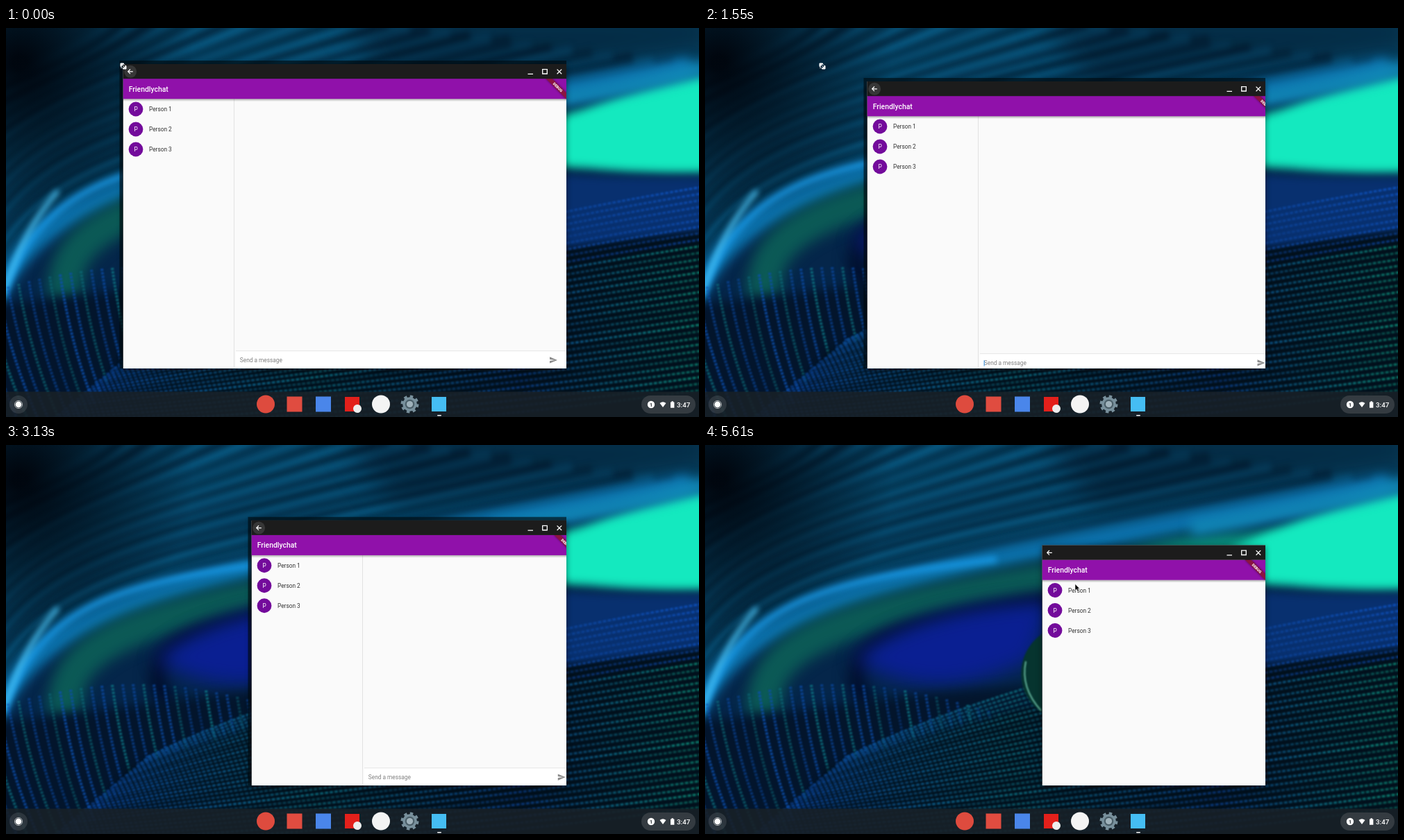
Recreate the animation shown at these times as an HTML page with a canvas. Size 998 px wide and 561 px high, loop 5740 ms.

```html
<!DOCTYPE html>
<html lang="en">
<head>
<meta charset="utf-8">
<title>Resizing a chat window</title>
<style>
  html, body { margin: 0; width: 100%; height: 100%; overflow: hidden; background: #03121f; }
  canvas, #stage { position: absolute; left: 0; top: 0; width: 998px; height: 561px; }
  text { font-family: Roboto, Arial, sans-serif; }
  .item { font-size: 8.32px; fill: #333; }
</style>
</head>
<body>
<canvas id="wall" width="998" height="561"></canvas>
<svg id="stage" viewBox="0 0 998 561">
  <defs>
    <linearGradient id="fade" x2="0" y2="1">
      <stop stop-color="#000" stop-opacity=".32"/><stop offset="1" stop-color="#000" stop-opacity="0"/>
    </linearGradient>
  </defs>

  <g id="shelf">
    <rect y="524.5" width="998" height="36.5" fill="#182027" fill-opacity=".88"/>
    <circle cx="18" cy="543" r="13" fill="#fff" fill-opacity=".1"/>
    <circle cx="18" cy="543" r="5.6" fill="none" stroke="#fff" stroke-opacity=".6"/>
    <circle cx="18" cy="543" r="4.4" fill="#fff"/>
    <circle cx="374" cy="542.5" r="13" fill="#de4b3e"/>
    <rect x="404.5" y="531.5" width="22" height="22" fill="#e04c40"/>
    <rect x="446" y="531.5" width="22" height="22" fill="#4a86ea"/>
    <rect x="488" y="532" width="21" height="21" fill="#e3201b"/>
    <circle cx="506" cy="549" r="6" fill="#eee"/>
    <circle cx="540" cy="542.5" r="13" fill="#f4f4f4"/>
    <g transform="translate(581.5 542.5)">
      <circle r="10.5" fill="none" stroke="#78909c" stroke-width="5" stroke-dasharray="4.12"/>
      <circle r="10.3" fill="#78909c"/>
      <circle r="6.8" fill="#4b5f69"/>
      <circle r="4.6" fill="#9fb2bb"/>
    </g>
    <rect x="613" y="532" width="21" height="21" fill="#45bdf3"/>
    <rect x="621" y="558" width="6" height="1.6" rx=".8" fill="#fff"/>
    <rect x="915" y="530" width="78" height="26" rx="13" fill="#343b41"/>
    <circle cx="929" cy="543" r="5.2" fill="#fff"/>
    <text x="929" y="546" font-size="8" font-weight="700" text-anchor="middle" fill="#30363b">1</text>
    <path d="M941.5 541Q946 537.4 950.5 541L946 547Z" fill="#fff"/>
    <path d="M957 539.5h1.5v-1.2h2.4v1.2h1.5v8.2h-5.4z" fill="#fff"/>
    <text x="966" y="546.5" font-size="9.8" font-weight="500" fill="#fff">3:47</text>
  </g>

  <rect id="frame" fill="#000a10" fill-opacity=".62"/>
  <rect id="shadow" style="filter:drop-shadow(0 2px 4px rgba(0,0,0,.5))"/>

  <svg id="win" overflow="hidden">
    <rect width="100%" height="100%" fill="#fafafa"/>
    <g id="list"></g>
    <g id="wide">
      <path d="M160 50V600" stroke="#e2e2e2"/>
      <g id="bar">
        <rect x="162.5" y="-25" width="700" height="40" fill="#fff"/>
        <path d="M162.5 -25.3H860" stroke="#e0e0e0" stroke-width=".8"/>
        <text x="168.3" y="-9" font-size="8.32" fill="#808080">Send a message</text>
        <path id="caret" d="M168.6 -15.8v8.4" stroke="#2a8be0"/>
      </g>
      <path id="send" fill="#8c8c8c" d="M2 21L23 12 2 3v7l15 2-15 2z"/>
    </g>
    <rect y="50" width="100%" height="4" fill="url(#fade)"/>
    <rect y="21" width="100%" height="29.2" fill="#9011aa"/>
    <text x="8.2" y="39.7" font-size="10.4" font-weight="500" fill="#fff">Friendlychat</text>
    <g id="debug">
      <g transform="translate(0 21) rotate(45)">
        <rect x="-20.8" y="14.5" width="41.6" height="6.3" fill="#8c1440"
              style="filter:drop-shadow(0 0 1.5px rgba(0,0,0,.5))"/>
        <text y="19.5" font-size="5.3" font-weight="900" text-anchor="middle" fill="#fff">DEBUG</text>
      </g>
    </g>
    <rect width="100%" height="21.2" fill="#1c1c1c"/>
    <circle id="halo" cx="10.6" cy="10.8" r="9" fill="#373737"/>
    <path d="M14.3 10.8H7.4M10.5 7.5L7.2 10.8l3.3 3.3" fill="none" stroke="#fff" stroke-width="1.2"/>
    <g id="buttons" fill="none" stroke="#fff" stroke-width="1.3">
      <path d="M-55.5 14.3h7.5M-34.3 7.6h6.6v6.4h-6.6zM-13.4 7.6l6.6 6.6m0-6.6l-6.6 6.6"/>
    </g>
  </svg>

  <g id="resize" transform="translate(169 55)" stroke-linejoin="round">
    <path id="grip" d="M-4-4h4.5v1.3h-3.2v3.2h-1.3zM4 4h-4.5v-1.3h3.2v-3.2h1.3zM-2.5-2.5L2.5 2.5M-1.5 2.2h-2.4M1.8-1.5v-1"
          fill="#fff" stroke="#fff" stroke-width="1"/>
  </g>
  <path id="arrow" d="M0 0v9.2l2.1-1.9 1.5 3.3 1.6-.7-1.4-3.2h2.8z" fill="#000" stroke="#fff" stroke-width=".5"/>
</svg>

<script>
const LOOP = 5740, RIGHT = 807, BOTTOM = 491, TICK = 130;
const $ = id => document.getElementById(id);
const set = (id, attrs) => { for (const k in attrs) $(id).setAttribute(k, attrs[k]); };
const show = (id, on) => set(id, { visibility: on ? 'visible' : 'hidden' });
const move = (id, x, y, more = '') => set(id, { transform: `translate(${x} ${y}) ${more}` });
const mix = (a, b, k) => a + (b - a) * k;

// time, left edge, top edge of the window
const path = [
  [0, 168.5, 52], [430, 170.5, 56], [640, 172, 60], [900, 179, 64], [1160, 197, 71],
  [1420, 221, 73], [1550, 233.5, 77], [1940, 270, 92], [2330, 313, 106], [2460, 322.5, 108.5],
  [2590, 322.5, 108.5], [2870, 330, 108.5], [3390, 377, 109], [3650, 411, 121.5], [3780, 413, 123.5],
  [4040, 413, 123.5], [4430, 465.5, 137], [4560, 467, 138], [4690, 460, 134], [4950, 472, 140],
  [5280, 485.5, 144.5]
];
const ticks = [0, 430];
for (let t = 640; t <= 2590; t += TICK) ticks.push(t);
for (let t = 2870; t <= 4950; t += TICK) ticks.push(t);
ticks.push(5280);

function corner(t) {
  const i = path.findIndex(p => p[0] >= t);
  const b = path[i], a = path[Math.max(0, i - 1)];
  const k = b === a ? 0 : (t - a[0]) / (b[0] - a[0]);
  return [mix(a[1], b[1], k), mix(a[2], b[2], k)];
}

$('list').innerHTML = [1, 2, 3].map(n => `<g transform="translate(0 ${36 + 29 * n})">
  <circle cx="18.5" r="10.4" fill="#730b9b"/>
  <text class="item" x="18.5" y="3" text-anchor="middle" style="fill:#fff">P</text>
  <text class="item" x="37.5" y="3">Person ${n}</text></g>`).join('');

function render(t) {
  const i = ticks.findLastIndex(s => s <= t), last = i === ticks.length - 1;
  const [x, y] = corner(ticks[i]);
  // the content is laid out for the size the window had one step earlier
  const [px, py] = last ? [x, y] : corner(ticks[Math.max(0, i - 1)]);
  const w = RIGHT - x, h = BOTTOM - y, lagX = x - px, lagY = y - py;

  set('win', { x, y, width: w, height: h });
  set('shadow', { x, y, width: w, height: h });
  set('frame', { x: x - 5, y: y - 5, width: w + 5, height: h + 5 });
  move('buttons', w, 0);
  move('debug', w + lagX, 0);
  move('bar', 0, h + lagY);
  move('send', w + lagX - 25, h + lagY - 18.3, 'scale(.52)');
  set('wide', { display: RIGHT - x > 417 ? 'inline' : 'none' });
  set('caret', { display: t >= 100 && t < 2590 ? 'inline' : 'none' });
  show('frame', !last);
  show('halo', !last);
  show('resize', t < 1940);
  show('arrow', last);
  if (t < 5430) move('arrow', 513, 175);
  else if (t < 5610) move('arrow', 523, 184);
  else move('arrow', 533, 200.5);
}

function paintWall() {
  const c = $('wall').getContext('2d');
  const rnd = n => { const v = Math.sin(n * 127.1) * 43758.5; return v - Math.floor(v); };
  const blur = r => c.filter = r ? `blur(${r}px)` : 'none';
  const fill = (color, r, d) => { blur(r); c.fillStyle = color; c.fill(new Path2D(d)); };
  const line = (color, width, r, d) => {
    blur(r); c.strokeStyle = color; c.lineWidth = width; c.stroke(new Path2D(d));
  };
  const arc = s => `M-20 ${410 - 330 * s}C${60 + 20 * s} ${210 - 170 * s} ${330 - 150 * s} ${190 - 190 * s} ${1020 - 850 * s} ${60 - 120 * s}`;

  fill('#074566', 0, 'M0 0H998V561H0z');
  for (let i = 0; i < 30; i++) {
    const s = i / 29;
    c.globalAlpha = .35 + .4 * rnd(i + 3);
    line(i % 2 ? '#0b638f' : '#021527', 8 + 12 * rnd(i), 4, arc(s));
  }
  c.globalAlpha = 1;
  const dark = c.createRadialGradient(20, 50, 10, 20, 50, 250);
  dark.addColorStop(0, 'rgba(0,3,10,.95)');
  dark.addColorStop(1, 'rgba(0,3,10,0)');
  fill(dark, 0, 'M0 0H300V320H0z');
  fill('rgba(2,22,40,.55)', 20, 'M480 -20H1020V30L560 90z');

  // the eye of the feather
  fill('#05264a', 6, arc(0) + 'V580H-20z');
  line('#0c71ac', 28, 8, arc(.04));
  line('#1899e6', 9, 5, 'M-10 400C45 240 130 200 420 165');
  line('#4cc8fb', 6, 4, 'M-5 385Q25 290 75 235');
  line('#0b5a56', 48, 10, 'M85 390C75 275 210 240 570 180');
  line('#020f2c', 26, 10, 'M235 380C170 280 300 250 560 215');
  fill('#0a1f92', 14, 'M215 310Q300 235 500 225L470 310Q330 380 215 310z');
  fill('#0a8f7c', 10, 'M560 165Q700 120 830 125V195H560z');
  fill('#14e9bf', 7, 'M760 150Q860 95 1020 62V208Q880 212 760 192z');
  line('#1187b8', 22, 8, 'M700 120Q860 95 1020 55');
  fill('#08306f', 6, 'M700 205Q880 220 1020 215V350H700z');

  // barbs on the left and the lower right
  fill('#03152c', 8, 'M-20 400Q150 380 300 360L480 345V580H-20z');
  for (let i = 0; i < 34; i++) {
    const x = i * 15 - 60, top = 395 - 50 * Math.sin(i / 11);
    c.globalAlpha = .45 + .5 * rnd(i);
    c.setLineDash([3, 2]);
    line(i % 3 ? '#0c4fae' : '#0d7382', 4, .8, `M${x - 12} ${top}Q${x + 5} 470 ${x + 45} 561`);
  }
  c.globalAlpha = 1;
  c.setLineDash([]);
  fill('#02101c', 4, 'M175 468Q470 350 1020 290V580H100z');
  for (let k = -40; k < 240; k += 9) {
    c.globalAlpha = .5 + .4 * rnd(k);
    const shade = c.createLinearGradient(150, 0, 998, 0);
    shade.addColorStop(0, '#0b469c');
    shade.addColorStop(.35, '#0b6677');
    shade.addColorStop(.7, '#0b3e8c');
    shade.addColorStop(1, k < 40 ? '#0d4fb8' : '#0c8470');
    c.setLineDash([5, 2]);
    line(shade, 3.4, .8, `M${180 - k * .6} ${470 + k * .5}Q480 ${355 + k} 1010 ${270 + k * 1.05}`);
  }
  c.setLineDash([]);
  c.globalAlpha = 1;

  // dew drop
  fill('#06342f', 1, 'M486 272C445 300 445 360 486 386z');
  line('#67b8a0', 2, 1, 'M462 312Q454 350 484 383');
}

paintWall();
const start = performance.now();
(function tick() {
  render((performance.now() - start) % LOOP);
  requestAnimationFrame(tick);
})();
</script>
</body>
</html>
```
